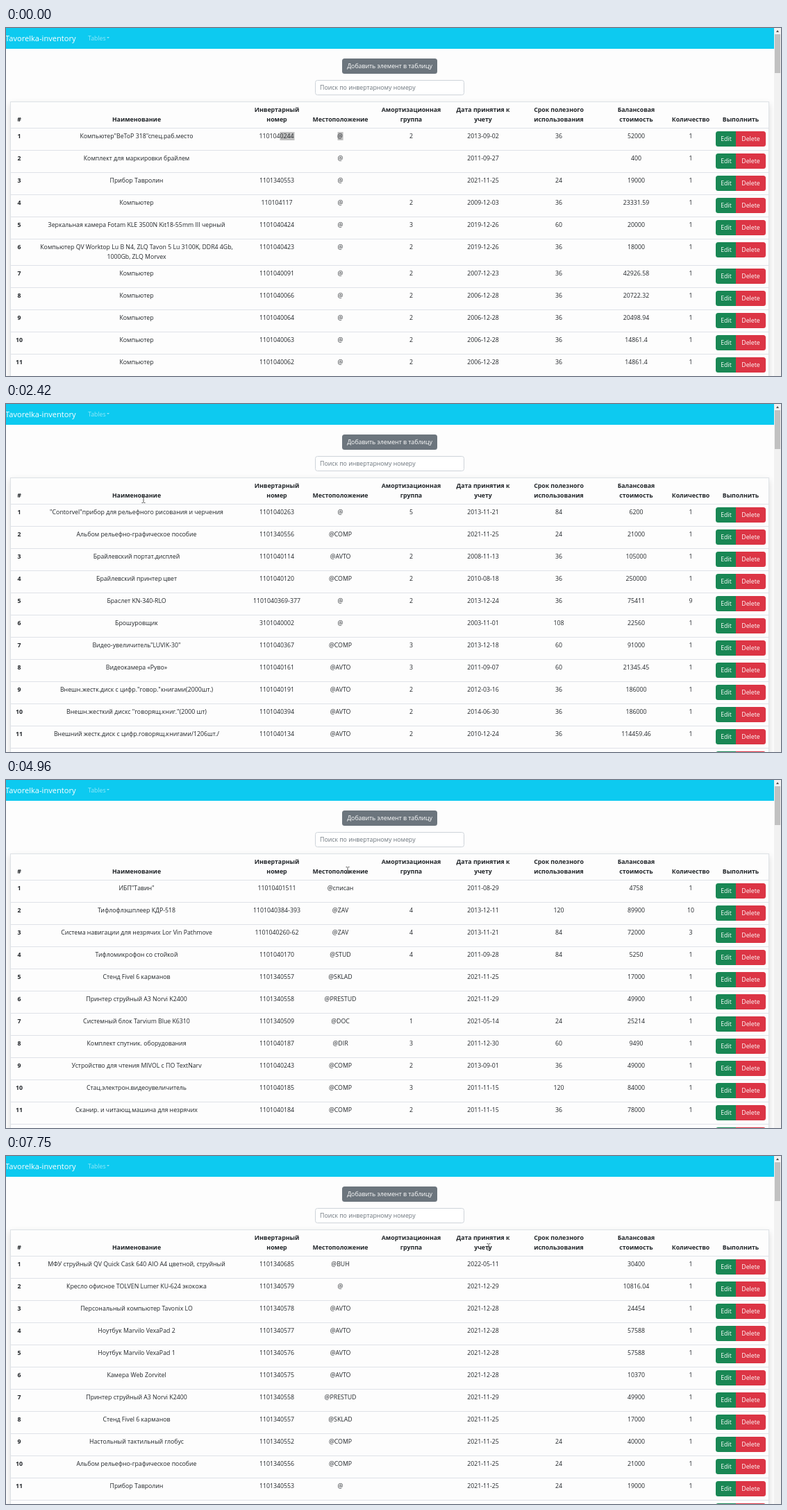
An HTML page for the animation above (8000 ms loop, 1116 by 502 pixels).

```html
<!DOCTYPE html>
<html lang="ru">
<head>
<meta charset="utf-8">
<title>Inventory</title>
<style>
html, body { margin: 0; width: 100%; height: 100%; overflow: hidden; }
#stage { position: relative; width: 1116px; height: 502px; overflow: hidden; background: #fdfdfd;
  font: 8.75px/14px "Open Sans", "Noto Sans", sans-serif; color: #212529; }
#stage div, #cursor { position: absolute; box-sizing: border-box; white-space: pre; }
#nav { left: 0; top: 0; width: 1106px; height: 30px; background: #0dcaf0; color: #fff; }
#brand { left: -1px; top: 7px; font-size: 11.1px; line-height: 16px; }
#menu { left: 118px; top: 8px; opacity: .55; }
#caret { left: 145px; top: 13px; border: 2.5px solid transparent; border-top-color: #fff; opacity: .55; }
#add { left: 484px; top: 44px; width: 137px; height: 22px; border-radius: 3.5px; background: #6c757d;
  color: #fff; line-height: 22px; text-align: center; }
#search { left: 445px; top: 75px; width: 215px; height: 22px; border: 1px solid #ced4da; border-radius: 3.5px;
  background: #fff; color: #6c757d; padding-left: 6px; line-height: 21px; }
#card { left: 6px; top: 106px; width: 1093px; height: 420px; border: 1px solid #dee2e6;
  box-shadow: 0 4px 9px rgba(0,0,0,.15); background: #fdfdfd; }
.view { left: 0; top: 0; width: 1106px; height: 502px; }
.row { left: 7px; width: 1091px; height: 1px; background: #dfe2e8; }
.cell { transform: translateX(-50%); text-align: center; }
.bold { font-weight: 700; }
.btn { height: 22px; line-height: 22px; color: #fff; text-align: center; }
.edit { left: 1022px; width: 30px; background: #198754; border-radius: 3.5px 0 0 3.5px; }
.del { left: 1051px; width: 43px; background: #dc3545; border-radius: 0 3.5px 3.5px 0; }
mark { background: #c0c0c0; color: inherit; padding: 0 1px 0 0; }
#bar { left: 1106px; top: 0; width: 10px; height: 502px; background: #f1f1f1; }
#thumb { left: 1px; top: 9px; width: 8px; height: 56px; background: #c1c1c1; }
#up { left: 2.5px; top: 1px; border: 2.5px solid transparent; border-bottom: 3px solid #505050; }
#cursor { left: 0; top: 0; width: 20px; height: 20px; overflow: visible; }
</style>
</head>
<body>
<div id="stage">
  <div id="nav"><div id="brand">Tavorelka-inventory</div><div id="menu">Tables</div><div id="caret"></div></div>
  <div id="add">Добавить элемент в таблицу</div>
  <div id="search">Поиск по инвертарному номеру</div>
  <div id="card"></div>
  <div id="bar"><div id="thumb"></div><div id="up"></div></div>
  <svg id="cursor">
    <path id="beam" d="M-2.5-4.5H-.6M.6-4.5H2.5M0-4V4M-2.5 4.5H-.6M.6 4.5H2.5" fill="none" stroke="#444" stroke-width=".9"/>
    <path id="arrow" d="M0 0V9.6L2.2 7.6 3.7 11 5.2 10.3 3.8 7.1H6.8Z" fill="#fff" stroke="#111" stroke-width=".8"/>
  </svg>
</div>
<script>
const LOOP = 8000;
const stage = document.getElementById('stage');
const cursor = document.getElementById('cursor');
const beam = document.getElementById('beam');
const arrow = document.getElementById('arrow');

// Column title, centre and half width of the title text
const columns = [
  ['#', 19, 3], ['Наименование', 188, 35], ['Инвертарный\nномер', 390, 32], ['Местоположение', 481.5, 41],
  ['Амортизационная\nгруппа', 583.5, 43], ['Дата принятия к\nучету', 687, 39],
  ['Срок полезного\nиспользования', 796, 37], ['Балансовая\nстоимость', 907.5, 27],
  ['Количество', 986, 27], ['Выполнить', 1058, 26]
];

// Rows that occur in several orders
const drawing = '"Contorvel"прибор для рельефного рисования и черчения|1101040263|@|5|2013-11-21|84|6200';
const album = 'Альбом рельефно-графическое пособие|1101340556|@COMP||2021-11-25|24|21000';
const bracelet = 'Браслет KN-340-RLO|1101040369-377|@|2|2013-12-24|36|75411|9';
const binder = 'Брошуровщик|3101040002|@||2003-11-01|108|22560';
const kit = 'Комплект для маркировки брайлем||@||2011-09-27||400';
const camera = 'Зеркальная камера Fotam KLE 3500N Kit18-55mm III черный|1101040424|@|3|2019-12-26|60|20000';
const reader = 'Устройство для чтения MIVOL с ПО TextNarv|1101040243|@COMP|2|2013-09-01|36|49000';
const stand = 'Стенд Fivel 6 карманов|1101340557|@SKLAD||2021-11-25||17000';
const printer = 'Принтер струйный А3 Norvi K2400|1101340558|@PRESTUD||2021-11-29||49900';
const device = 'Прибор Тавролин|1101340553|@||2021-11-25|24|19000';
const pc = (no, date, price) => `Компьютер|${no}|@|2|${date}|36|${price}`;

// Start time and rows of each sort order
const views = [
  [0, [
    'Компьютер"ВеТоР 318"спец.раб.место|110104<mark>0244</mark>|<mark>@</mark>|2|2013-09-02|36|52000',
    kit, device, pc('110104117', '2009-12-03', '23331.59'), camera,
    'Компьютер QV Worktop Lu B N4, ZLQ Tavon 5 Lu 3100K, DDR4 4Gb,\n1000Gb, ZLQ Morvex|1101040423|@|2|2019-12-26|36|18000',
    pc('1101040091', '2007-12-23', '42926.58'), pc('1101040066', '2006-12-28', '20722.32'),
    pc('1101040064', '2006-12-28', '20498.94'), pc('1101040063', '2006-12-28', '14861.4'),
    pc('1101040062', '2006-12-28', '14861.4')
  ]],
  [840, [
    'Экран настенный|1101040172|@CHIT|3|2011-09-07|60|7155.75',
    'Цифровые"говорящие"книги с криптозащитойдля записи на флеш-\nкарт.внеш.ж.диск(1100)|1101040406|@|2|2016-09-01|36|159500',
    'Цифровые"говорящие" книги с криптозащитой(1100 книг)|1101040407|@AVTO|2|2017-12-13|36|176000',
    'Цифровые"говор".книги на внеш.жестком диске(900 книг)|1101040405|@|2|2015-09-29|36|105000',
    'Цифровые говор.книги внеш.жесткий диск (1 нак.1100 книг)|1101040408|@AVTO||2018-06-27|36|185900',
    'Цифровые "говорящие" книги с крипт для записи на флеш-картах (1\nнакоп 1100 кн)|1101340617|@AVTO|1|2021-10-01|24|237770',
    'Цифровые "говорящие" книги для записи на флеш-картах накопит. на\nвнеш.жд 1 нак 1|1101040421|@AVTO|2|2019-04-19|36|202000',
    'Факс/копир Tolvarnek|1101040200|@|3|2012-12-29|60|5398.5',
    'Факс "Tolvarnek"|1101040046|@|4|2005-12-31|84|8564.28',
    reader,
    'Устроиство спец.для чтения"Говорящих кнаг"КДР-ВЕГО-2"|1101040419|@|5|2018-12-18|120|13000'
  ]],
  [1840, [
    drawing, album,
    'Брайлевский портат.дисплей|1101040114|@AVTO|2|2008-11-13|36|105000',
    'Брайлевский принтер цвет|1101040120|@COMP|2|2010-08-18|36|250000',
    bracelet, binder,
    'Видео-увеличитель"LUVIK-30"|1101040367|@COMP|3|2013-12-18|60|91000',
    'Видеокамера «Руво»|1101040161|@AVTO|3|2011-09-07|60|21345.45',
    'Внешн.жестк.диск с цифр."говор."книгами(2000шт.)|1101040191|@AVTO|2|2012-03-16|36|186000',
    'Внешн.жесткий дискс "говорящ.книг."(2000 шт)|1101040394|@AVTO|2|2014-06-30|36|186000',
    'Внешний жестк.диск с цифр.говорящ.книгами/1206шт./|1101040134|@AVTO|2|2010-12-24|36|114459.46'
  ]],
  [4600, [
    'ИБП"Тавин"|11010401511|@списан||2011-08-29||4758',
    'Тифлофлэшплеер КДР-518|1101040384-393|@ZAV|4|2013-12-11|120|89900|10',
    'Система навигации для незрячих Lor Vin Pathmove|1101040260-62|@ZAV|4|2013-11-21|84|72000|3',
    'Тифломикрофон со стойкой|1101040170|@STUD|4|2011-09-28|84|5250',
    stand, printer,
    'Системный блок Tarvium Blue K6310|1101340509|@DOC|1|2021-05-14|24|25214',
    'Комплект спутник. оборудования|1101040187|@DIR|3|2011-12-30|60|9490',
    reader,
    'Стац.электрон.видеоувеличитель|1101040185|@COMP|3|2011-11-15|120|84000',
    'Сканир. и читающ.машина для незрячих|1101040184|@COMP|2|2011-11-15|36|78000'
  ]],
  [5500, [
    drawing, bracelet, binder,
    'Диктофон цифровой|1101040119|@|4|2009-12-03|36|6664.14',
    'Жесткий диск 3.5"|1101040400|@|2|2014-12-03|36|4970',
    'Жесткий диск внеший 2,5" USB3.0|1101040201-202|@|2|2012-12-29|36|6006.28|2',
    'Звуковой маяк"Zovicall-KR-2"|1101040368|@|2|2013-12-24|36|24500',
    camera,
    'ИПБ ТЛВ|1101040145-150|@|2|2011-08-29|36|15150|5',
    'Информатор KN-310-RLO|1101040378-383|@|2|2013-12-24|36|187740|6',
    kit
  ]],
  [6700, [
    'МФУ струйный QV Quick Cask 640 AIO A4 цветной, струйный|1101340685|@BUH||2022-05-11||30400',
    'Кресло офисное TOLVEN Lumer KU-624 экокожа|1101340579|@||2021-12-29||10816.04',
    'Персональный компьютер Tavonix LO|1101340578|@AVTO||2021-12-28||24454',
    'Ноутбук Marvilo VexaPad 2|1101340577|@AVTO||2021-12-28||57588',
    'Ноутбук Marvilo VexaPad 1|1101340576|@AVTO||2021-12-28||57588',
    'Камера Web Zorvitel|1101340575|@AVTO||2021-12-28||10370',
    printer, stand,
    'Настольный тактильный глобус|1101340552|@COMP||2021-11-25|24|40000',
    album, device
  ]]
];

// Pointer path: time, x, y
const path = [
  [0, 398, 122], [1290, 398, 122], [1700, 198, 138], [3300, 198, 138], [4000, 487, 131], [4130, 492, 130],
  [5880, 492, 130], [6000, 636, 136], [6130, 695, 131], [LOOP, 695, 131]
];

function add(parent, cls, top, html = '', left) {
  const el = document.createElement('div');
  el.className = cls;
  el.style.top = top + 'px';
  if (left !== undefined) el.style.left = left + 'px';
  el.innerHTML = html;
  parent.append(el);
  return el;
}

function addRow(view, top, text, index) {
  add(view, 'row', top);
  add(view, 'btn edit', top + 5, 'Edit');
  add(view, 'btn del', top + 5, 'Delete');
  if (!text) return;
  const cells = text.split('|');
  if (cells.length < 8) cells.push('1');
  [index + 1, ...cells].forEach((value, i) =>
    add(view, i ? 'cell' : 'cell bold', top + 5, value, columns[i][1]));
}

for (const [title, x] of columns)
  add(stage, 'cell bold', title.includes('\n') ? 111 : 125, title, x);

const layers = views.map(([start, rows]) => {
  const view = add(stage, 'view', 0);
  let top = 144;
  [...rows, ''].forEach((text, i) => {
    addRow(view, top, text, i);
    top += text.includes('\n') ? 38 : 32;
  });
  return { start, view };
});
stage.append(cursor);

function pointer(t) {
  const i = path.findIndex(p => p[0] > t);
  const [t0, x0, y0] = path[i - 1], [t1, x1, y1] = path[i];
  const k = (t - t0) / (t1 - t0);
  return [x0 + (x1 - x0) * k, y0 + (y1 - y0) * k];
}

function draw(now) {
  const t = now % LOOP;
  const current = layers.filter(l => l.start <= t).pop();
  for (const l of layers) l.view.style.visibility = l === current ? 'visible' : 'hidden';
  const [x, y] = pointer(t);
  const overText = columns.some(c => Math.abs(x - c[1]) <= c[2]);
  cursor.style.transform = `translate(${x}px, ${y}px)`;
  cursor.style.visibility = t < 130 ? 'hidden' : 'visible';
  beam.style.display = overText ? '' : 'none';
  arrow.style.display = overText ? 'none' : '';
}

const origin = performance.now();
function tick() {
  draw(performance.now() - origin);
  requestAnimationFrame(tick);
}
tick();
</script>
</body>
</html>
```
